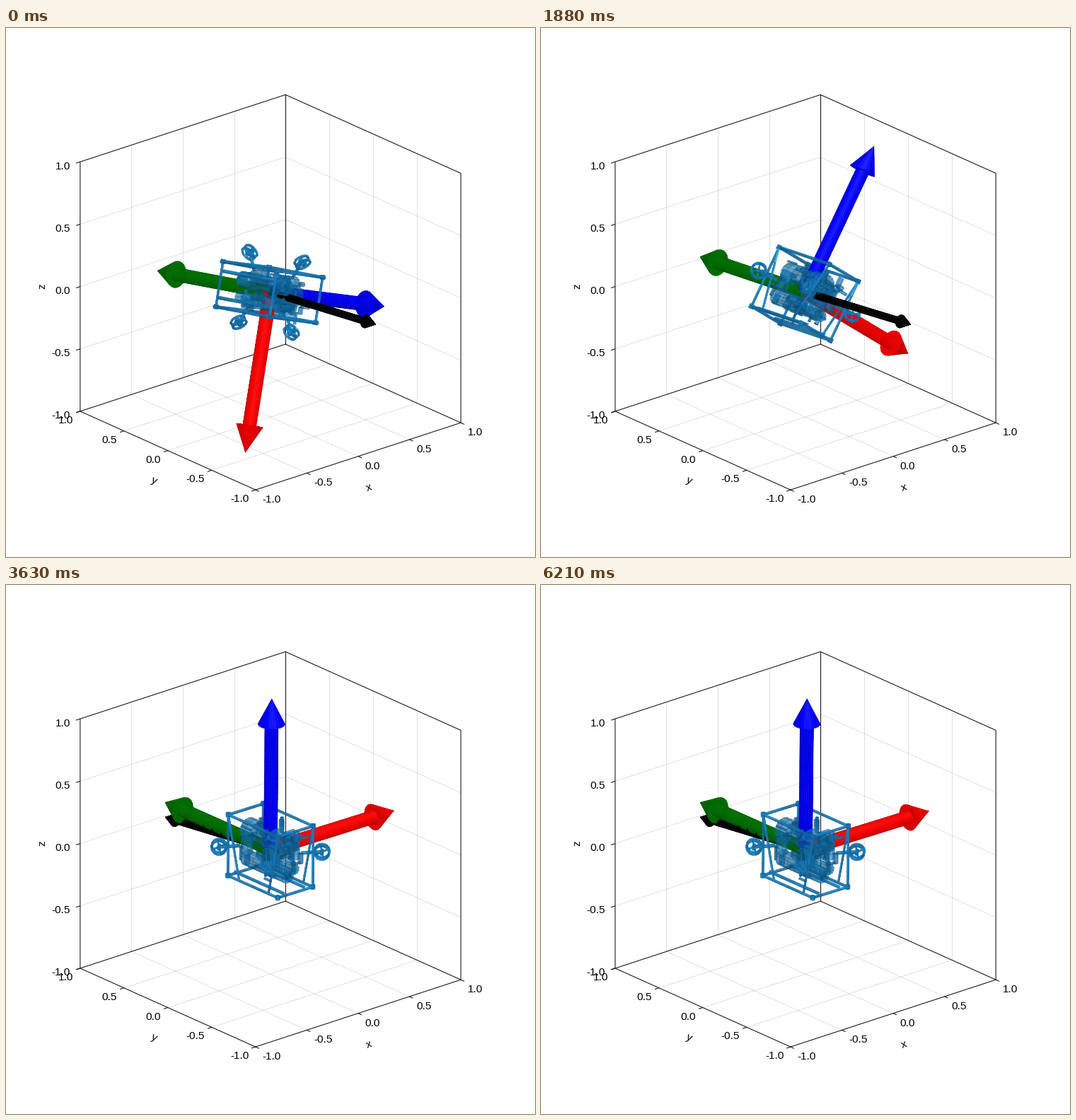
A matplotlib script that plays this animation: 748 by 748 pixels, repeating every 6250 ms.

```python
import numpy as np
import matplotlib.pyplot as plt
from matplotlib.animation import FuncAnimation
from matplotlib.collections import LineCollection, PolyCollection

SIZE, DPI = 748, 88
FRAMES, LOOP = 150, 6250
PT = 72 / DPI
FLIP = 2.415  # seconds until the attitude first crosses zero

# Orthographic camera: rows are right, up and towards the viewer.
AZ, EL = 1.275 * np.pi, np.pi / 8
CAMERA = np.array([
    [-np.sin(AZ), np.cos(AZ), 0],
    [-np.sin(EL) * np.cos(AZ), -np.sin(EL) * np.sin(AZ), np.cos(EL)],
    [np.cos(EL) * np.cos(AZ), np.cos(EL) * np.sin(AZ), np.sin(EL)],
])
SCALE, CENTER = 190.9, (374, 373.7)
LIGHT = np.array([0.1, 0.35, 0.93])

rng = np.random.default_rng(4)


def project(points):
    view = np.asarray(points, float) @ CAMERA.T
    return np.stack([CENTER[0] + SCALE * view[..., 0],
                     CENTER[1] - SCALE * view[..., 1]], -1)


# ---------- geometry ----------
def lathe(start, axis, profile, n=12):
    """Quads of a solid of revolution; profile holds (distance, radius)."""
    start, axis = np.asarray(start, float), np.asarray(axis, float)
    axis = axis / np.linalg.norm(axis)
    helper = np.eye(3)[np.argmin(abs(axis))]
    e1 = np.cross(helper, axis)
    e1 /= np.linalg.norm(e1)
    e2 = np.cross(axis, e1)
    a = np.linspace(0, 2 * np.pi, n + 1)[:, None]
    spokes = np.cos(a) * e1 + np.sin(a) * e2
    rings = [start + s * axis + r * spokes for s, r in profile]
    return np.concatenate([
        np.stack([p[:-1], p[1:], q[1:], q[:-1]], 1)
        for p, q in zip(rings, rings[1:])])


def arrow(axis, shaft=1.0, head=0.2, r=0.05, cap=0.1):
    body = [(s, r) for s in np.linspace(0, shaft, 11)]
    return lathe((0, 0, 0), axis,
                 [(0, 0)] + body + [(shaft, cap), (shaft + head, 0)], 20)


def tube(a, b, r, n=4, m=4):
    a, b = np.asarray(a, float), np.asarray(b, float)
    length = np.linalg.norm(b - a)
    return lathe(a, b - a, [(s, r) for s in np.linspace(0, length, m + 1)], n)


def barrel(a, b, r, n=16, m=7):
    a, b = np.asarray(a, float), np.asarray(b, float)
    length = np.linalg.norm(b - a)
    side = [(s, r) for s in np.linspace(0, length, m + 1)]
    return lathe(a, b - a, [(0, 0), (0, r * 0.6)] + side
                 + [(length, r * 0.6), (length, 0)], n)


def thruster(center, axis, r=0.055):
    center = np.asarray(center, float)
    axis = np.asarray(axis, float) / np.linalg.norm(axis)
    side = np.cross(axis, (0, 0, 1))
    a = np.linspace(0, 2 * np.pi, 15)[:, None]
    rim = center + r * (np.cos(a) * side + np.sin(a) * np.array([0, 0, 1]))
    parts = []
    for shift in (-0.018, 0.018):
        hoop = rim + shift * axis
        parts += [tube(p, q, 0.009, 4, 1) for p, q in zip(hoop, hoop[1:])]
    parts += [tube(center, rim[k], 0.006, 4, 2) for k in (1, 4, 8, 11)]
    parts.append(barrel(center - 0.04 * axis, center + 0.03 * axis, 0.014, 6, 1))
    return parts


def vehicle():
    hx, hy, hz, dz = 0.17, 0.285, 0.243, -0.012
    corner = {(i, j, k): np.array([i * hx, j * hy, k * hz + dz])
              for i in (-1, 1) for j in (-1, 1) for k in (-1, 1)}
    bars, soft = [], []
    for p in corner:
        bars.append(barrel(corner[p] - (0, 0, 0.015),
                           corner[p] + (0, 0, 0.015), 0.018, 6, 1))
        for ax in range(3):
            if p[ax] > 0:
                continue
            if ax == 2 and p[:2] == (-1, -1):
                continue
            q = tuple(1 if i == ax else v for i, v in enumerate(p))
            bars.append(tube(corner[p], corner[q], 0.0105))
    for i in (-1, 1):
        bars.append(tube(corner[i, 1, 1], (i * hx, 0.16, -hz), 0.009))
        bars.append(tube(corner[i, -1, 1], (i * hx, -0.18, -hz), 0.009))
        bars.append(tube((i * 0.1, -hy, -hz), (i * 0.1, hy, -hz), 0.012))
        for j in (-1, 1):
            bars.extend(thruster((i * 0.262, j * 0.28, 0), (1, -i * j, 0)))
            bars.append(tube((i * 0.13, j * 0.2, 0),
                             (i * 0.25, j * 0.27, 0), 0.013))
            soft.append(barrel((i * 0.1, j * 0.15, -0.05),
                               (i * 0.1, j * 0.15, 0.09), 0.045, 10, 3))

    soft.append(barrel((0, -0.17, 0.09), (0, 0.25, 0.09), 0.085))
    soft.append(barrel((-0.06, -0.27, -0.11), (-0.06, 0.2, -0.11), 0.06))
    soft.append(barrel((0.07, -0.2, -0.12), (0.07, 0.2, -0.12), 0.04, 10, 5))
    soft.append(barrel((-0.12, -0.1, 0.02), (0.13, -0.1, 0.02), 0.05, 10, 3))
    for _ in range(65):
        p = rng.uniform((-0.13, -0.24, -0.21), (0.13, 0.24, 0.16))
        d = np.eye(3)[rng.integers(3)] * rng.uniform(0.03, 0.1)
        soft.append(barrel(p, p + d, rng.uniform(0.007, 0.024), 6, 1))
    return np.concatenate(bars), np.concatenate(soft)


class Solid:
    def __init__(self, *groups):
        """Each group is (quads, rgb, alpha, colour jitter)."""
        self.quads = np.concatenate([g[0] for g in groups])
        q = self.quads
        normal = np.cross(q[:, 2] - q[:, 0], q[:, 3] - q[:, 1])
        self.normals = normal / (np.linalg.norm(normal, axis=1)[:, None] + 1e-12)
        rgba = []
        for quads, rgb, alpha, jitter in groups:
            k = len(quads)
            tone = 1 + rng.uniform(-jitter, jitter, (k, 1))
            rgba.append(np.hstack([np.array(rgb) / 255 * tone,
                                   np.full((k, 1), alpha)]))
        self.rgba = np.concatenate(rgba)

    def faces(self, rot):
        """Visible faces as screen polygons, depths and shaded colours."""
        normals = self.normals @ rot.T @ CAMERA.T
        seen = normals[:, 2] > 0
        quads = self.quads[seen] @ rot.T
        depth = quads.mean(1) @ CAMERA[2]
        lit = np.clip(normals[seen] @ LIGHT, 0, 1)[:, None]
        rgba = self.rgba[seen].copy()
        shine = 0.17 * lit ** 16 * (rgba[:, :3].max(1) > 0.8)[:, None]
        rgba[:, :3] = np.clip(rgba[:, :3] * (0.74 + 0.26 * lit) + shine, 0, 1)
        return project(quads), depth, rgba


bars, soft = vehicle()
body = Solid(
    (arrow((1, 0, 0)), (250, 0, 0), 1, 0),
    (arrow((0, 1, 0)), (0, 116, 0), 1, 0),
    (arrow((0, 0, 1)), (0, 0, 250), 1, 0),
    (bars, (24, 122, 184), 0.9, 0.12),
    (soft, (18, 108, 164), 0.66, 0.22),
)
torque = Solid((arrow((0, -1.2, 0.12), 1.09, 0.116, 0.026, 0.05),
                (0, 0, 0), 1, 0))


# ---------- motion ----------
def pitch(t):
    """Degrees: push against drag, damped swing, then a faint hunting."""
    if t < FLIP:
        return 110.6 - 128 * np.log(np.cosh(0.625 * t))
    u = t - FLIP
    swing = -16 * np.exp(-0.6 * u) * np.sin(2 * np.pi * u / 1.22)
    hunt = 0.8 * np.cos(2 * np.pi * (t - 6.21) / 1.2)
    return swing * max(0, 1 - u / 2.2) + hunt * min(1, u / 1.2)


def attitude(t):
    deg = pitch(t)
    s = max(0, deg / 110.6)
    green = np.array([-0.075 * s ** 3, 1, -0.15 * np.sin(np.pi / 2 * s)])
    green /= np.linalg.norm(green)
    sin, cos = np.sin(np.radians(deg)), np.cos(np.radians(deg))
    blue = np.array([sin, -(green[0] * sin + green[2] * cos) / green[1], cos])
    blue /= np.linalg.norm(blue)
    return np.stack([np.cross(green, blue), green, blue], 1)


# ---------- stage ----------
fig = plt.figure(figsize=(SIZE / DPI, SIZE / DPI), dpi=DPI, facecolor="white")
ax = fig.add_axes([0, 0, 1, 1])
ax.set(xlim=(0, SIZE), ylim=(SIZE, 0))
ax.axis("off")


def lines(segments, color, width):
    ax.add_collection(LineCollection(
        [project(s) for s in segments], colors=[color],
        linewidths=width * PT), autolim=False)


grid = []
for v in (-0.5, 0, 0.5):
    grid += [[(v, -1, -1), (v, 1, -1)], [(v, 1, -1), (v, 1, 1)],
             [(-1, v, -1), (1, v, -1)], [(1, v, -1), (1, v, 1)],
             [(-1, 1, v), (1, 1, v)], [(1, -1, v), (1, 1, v)]]
lines(grid, (0, 0, 0, 0.12), 1)
lines([[(-1, -1, -1), (1, -1, -1), (1, 1, -1), (-1, 1, -1), (-1, -1, -1)],
       [(-1, 1, -1), (-1, 1, 1), (1, 1, 1), (1, -1, 1), (1, -1, -1)],
       [(1, 1, -1), (1, 1, 1)]], (0, 0, 0, 0.9), 1.1)


def label(x, y, text, **kw):
    style = dict(ha="center", va="center", rotation_mode="anchor",
                 family="Liberation Sans", fontsize=15.4 * PT)
    ax.text(x, y, text, **{**style, **kw})


ticks = []
for v in (-1, -0.5, 0, 0.5, 1):
    ticks += [[(v, -1, -1), (v, -1.04, -1)],
              [(-1, v, -1), (-1.04, v, -1)],
              [(-1, 1, v), (-1.04, 1, v)]]
    text = f"{v:.1f}"
    zx, zy = project((-1, 1, v))
    label(zx - 14, zy + 5, text, ha="right", va="center_baseline")
    yx, yy = project((-1, v, -1))
    label(yx - 9.5, yy + 11.5, text, ha="right", va="center_baseline")
    xx, xy = project((v, -1, -1))
    label(xx + 9.5, xy + 12.5, text, ha="left", va="center_baseline")
lines(ticks, (0, 0, 0, 0.9), 1.1)
label(513, 650, "x", rotation=18)
label(209, 640, "y", rotation=-24)
label(51, 365, "z", rotation=90)

scene = PolyCollection([], linewidths=0.45, zorder=5)
ax.add_collection(scene, autolim=False)


def draw(i):
    t = i * LOOP / FRAMES / 1000
    # After the crossing the torque makes a half turn about x.
    turn = np.eye(3) if t < FLIP else np.diag([1.0, -1.0, -1.0])
    parts = zip(body.faces(attitude(t)), torque.faces(turn))
    polys, depth, rgba = (np.concatenate(p) for p in parts)
    order = np.argsort(depth)
    scene.set_verts(polys[order])
    scene.set_facecolor(rgba[order])
    scene.set_edgecolor(rgba[order])
    return [scene]


anim = FuncAnimation(fig, draw, frames=FRAMES, interval=LOOP / FRAMES,
                     repeat=True, repeat_delay=0, blit=False)
plt.show()
```
